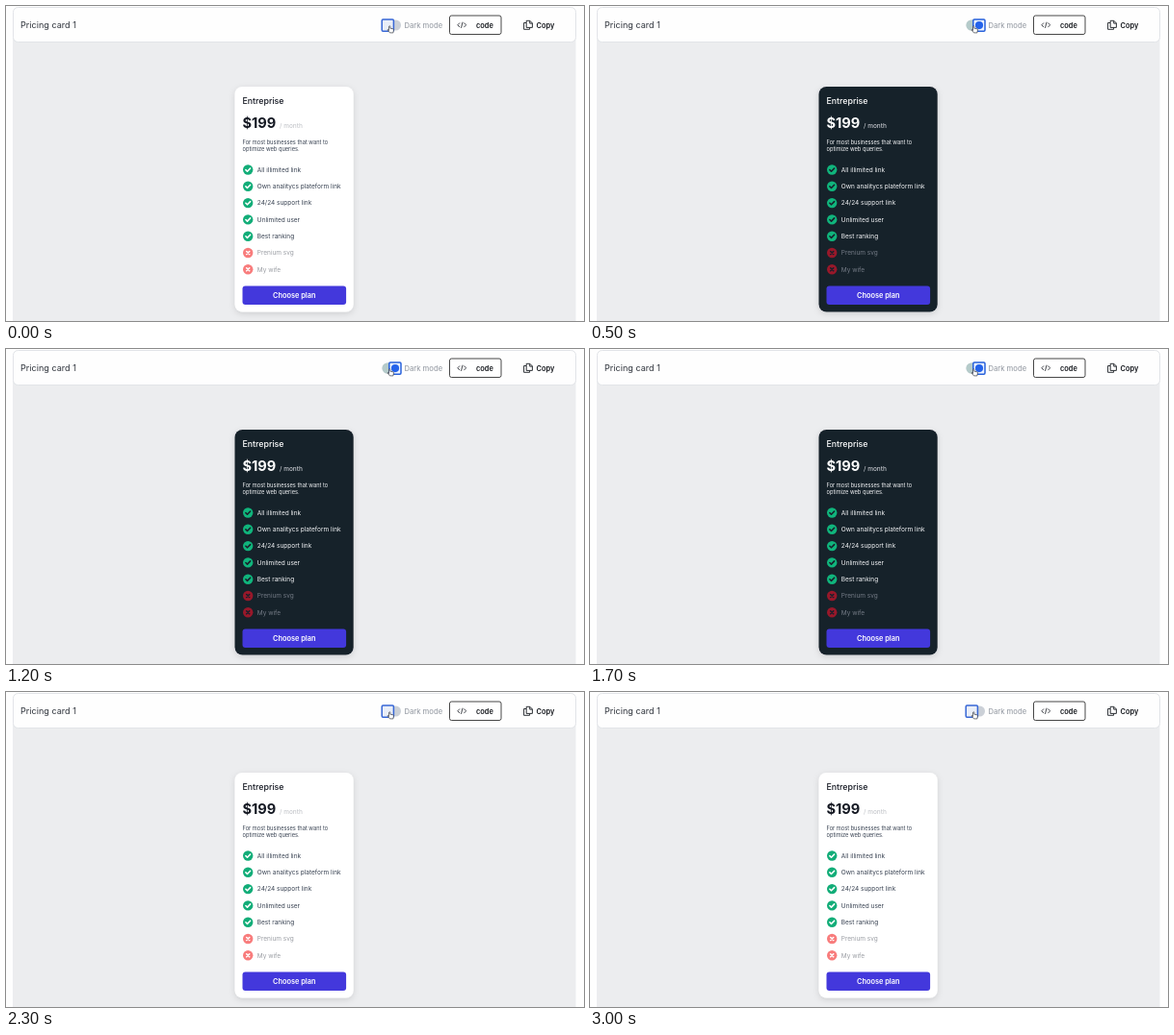
Write an HTML page that moves like this. It is 600 px wide and 328 px high and loops after 3.1 s.

```html
<!DOCTYPE html>
<html lang="en">
<head>
<meta charset="utf-8">
<title>Pricing card</title>
<style>
  html, body { margin: 0; width: 100%; height: 100%; overflow: hidden; background: #fefefe; }
  svg { display: block; width: 600px; height: 328px; font-family: Inter, sans-serif;
        --card: #fff; --ink: #151923; --body: #374151; --muted: #9a9da3; --month: #c6c8cc;
        --ok: #12ad78; --no: #f87c7c; }
  svg.dark { --card: #19202c; --ink: #fff; --body: #f5f6f8; --muted: #747b86; --month: #c4c7cd;
             --ok: #10b57c; --no: #98182a; }
  .dark .off, svg:not(.dark) .on { display: none; }
  .mark { fill: none; stroke: var(--card); stroke-width: 1.6; stroke-linecap: round; stroke-linejoin: round; }
</style>
</head>
<body>
<svg id="stage" viewBox="0 0 600 328">
  <defs>
    <filter id="shadow" x="-20%" y="-20%" width="140%" height="140%">
      <feDropShadow dx="0" dy="2" stdDeviation="3" flood-color="#000" flood-opacity=".13"/>
    </filter>
  </defs>
  <rect x="7" y="5" width="584.5" height="323" fill="#ecedef"/>
  <rect x="7.5" y="1.5" width="584" height="36" rx="5" fill="#fefefe" stroke="#e2e4e8"/>
  <text x="15" y="23.2" font-size="9.1" fill="#30353d">Pricing card 1</text>

  <rect x="390.5" y="14.5" width="19.5" height="11" rx="5.5" fill="#cbd0d7"/>
  <g class="off">
    <rect x="390.2" y="14" width="12.2" height="12.2" rx="1.2" fill="#e9eef8" stroke="#3767d6" stroke-width="1.5"/>
  </g>
  <g class="on">
    <rect x="390.5" y="14.5" width="16" height="11" rx="5.5" fill="#b5cbca"/>
    <rect x="397.8" y="14" width="12.2" height="12.2" rx="1.2" fill="#eef4ff" stroke="#2861db" stroke-width="1.5"/>
    <circle cx="404" cy="20.1" r="4.1" fill="#2563eb"/>
  </g>
  <path d="M397.5 25.5V21.2q.7-1 1.4 0v2l3 .7q.7.3.5 1.2l-.5 2.8h-3.4l-2.6-3q.5-1 1.6.6" fill="#fff" stroke="#343841" stroke-width=".7" stroke-linejoin="round"/>
  <text x="413.5" y="22.6" font-size="7.6" font-weight="500" fill="#9da2aa">Dark mode</text>

  <rect x="460.5" y="10" width="53.5" height="19.5" rx="2" fill="#fff" stroke="#333" stroke-width=".9"/>
  <path d="M471 17.5l-2.2 2.3 2.2 2.3M475.4 17.5l2.2 2.3-2.2 2.3M474 16.7l-1.5 6.2" fill="none" stroke="#30343a" stroke-width=".9"/>
  <text x="488" y="22.5" font-size="7.4" font-weight="600" fill="#15181d">code</text>
  <path d="M540.2 15.3h3.6l2.6 2.6v4.5h-6.2zM543.7 15.4v2.7h2.6M540 17.5h-2.4v6.8h6v-1.7" fill="none" stroke="#22262c" stroke-width=".95" stroke-linejoin="round"/>
  <text x="550.5" y="22.6" font-size="7.4" font-weight="600" fill="#15181d">Copy</text>

  <rect x="237.5" y="84" width="123.2" height="234.5" rx="8" fill="var(--card)" filter="url(#shadow)"/>
  <text x="245.5" y="101.8" font-size="8.8" font-weight="500" fill="var(--ink)">Entreprise</text>
  <text x="245.5" y="127" font-size="14.6" font-weight="700" fill="var(--ink)">$199</text>
  <text x="284" y="127" font-size="6.5" font-weight="500" fill="var(--month)">/ month</text>
  <g font-size="5.7" fill="var(--body)">
    <text x="245.5" y="143.6">For most businesses that want to</text>
    <text x="245.5" y="151.2">optimize web queries.</text>
  </g>
  <g id="features" font-size="6.5"></g>
  <rect x="245.5" y="291.5" width="107.6" height="19.5" rx="3" fill="#4338dc"/>
  <text x="299.3" y="304" font-size="7.4" font-weight="600" fill="#fff" text-anchor="middle">Choose plan</text>
</svg>
<script>
  const stage = document.getElementById('stage');
  const features = ['All illimited link', 'Own analitycs plateform link', '24/24 support link',
    'Unlimited user', 'Best ranking', 'Prenium svg', 'My wife'];

  document.getElementById('features').innerHTML = features.map((label, i) => {
    const included = i < 5;
    const icon = included ? 'M-2.3 .1L-.7 1.7L2.4-1.5' : 'M-1.5-1.5L1.5 1.5M1.5-1.5L-1.5 1.5';
    return `<g transform="translate(251.2 ${170.5 + i * 17.3})">
      <circle r="5.2" fill="var(--${included ? 'ok' : 'no'})"/>
      <path class="mark" d="${icon}"/>
      <text x="9.6" y="2.3" fill="var(--${included ? 'body' : 'muted'})">${label}</text>
    </g>`;
  }).join('');

  function draw() {
    const time = performance.now() % 3100;
    stage.classList.toggle('dark', time >= 500 && time < 2300);
    requestAnimationFrame(draw);
  }
  draw();
</script>
</body>
</html>
```
